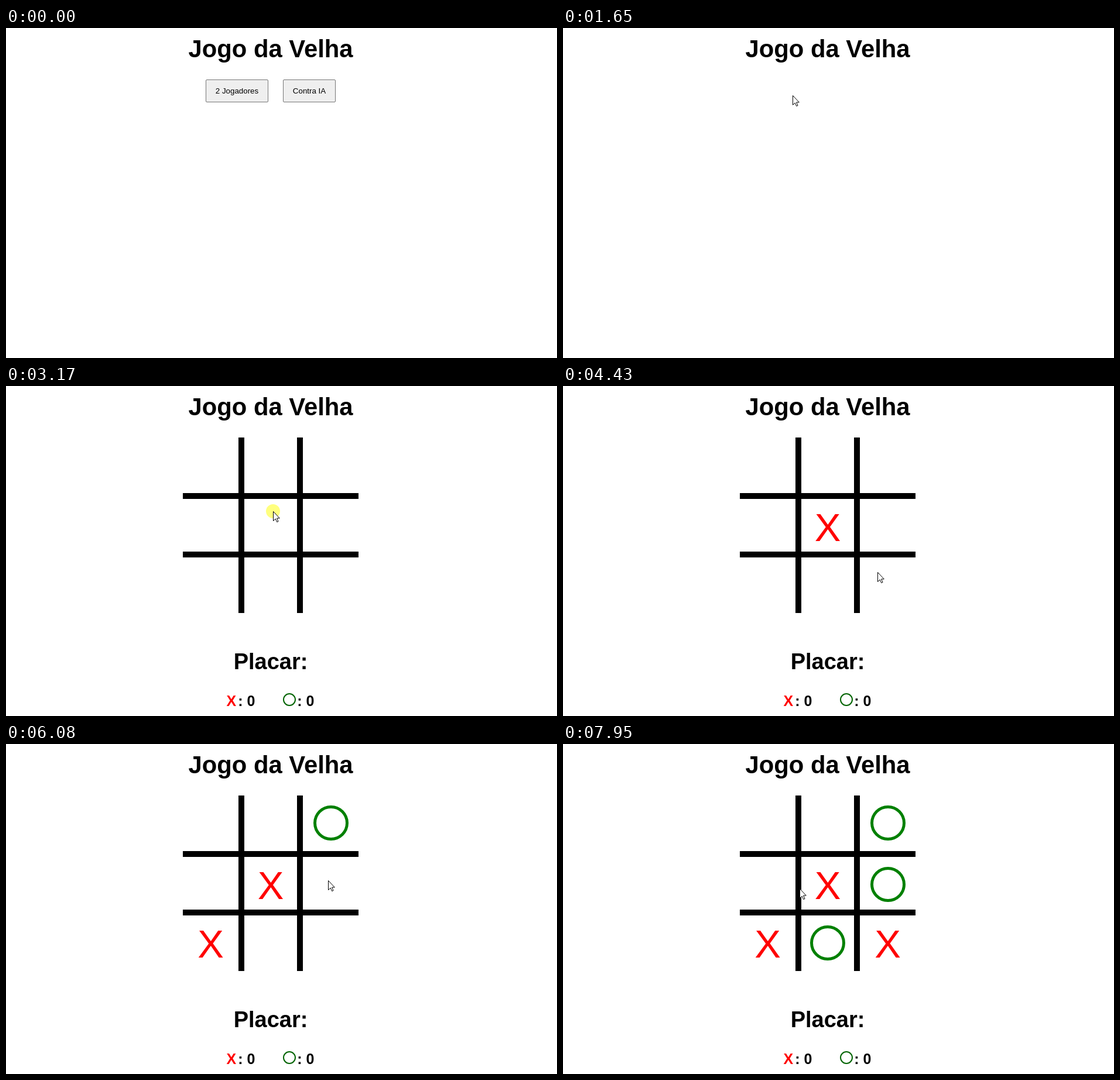
An HTML page for the animation above (8 s loop, 941 by 564 pixels).

```html
<!DOCTYPE html>
<html lang="pt">
<head>
<meta charset="utf-8">
<title>Jogo da Velha</title>
<style>
  html, body { margin: 0; width: 100%; height: 100%; overflow: hidden; background: #fff; }
  svg { display: block; font-family: Arial, "Liberation Sans", sans-serif; }
  .bold { font-weight: bold; }
  .mid { text-anchor: middle; }
  .button rect { fill: #efefef; stroke: #767676; }
  .button text { font-size: 13.333px; }
  .button.hover rect { fill: #e5e5e5; stroke: #4f4f4f; }
  .score { font-size: 25px; }
  .x { fill: #f00; }
  .mark { font-size: 67px; }
  .o { fill: none; stroke: #008000; stroke-width: 5; }
  .small.o { stroke: #006400; stroke-width: 2; }
  [hidden] { display: none; }
</style>
</head>
<body>
<svg width="941" height="564" viewBox="0 0 941 564">
  <text class="bold mid" x="452" y="50" font-size="41.8">Jogo da Velha</text>

  <g id="menu">
    <g class="button" id="twoPlayers">
      <rect x="341.5" y="88.5" width="106" height="38" rx="1.5"/>
      <text class="mid" x="394.5" y="112">2 Jogadores</text>
    </g>
    <g class="button">
      <rect x="473.5" y="88.5" width="89" height="38" rx="1.5"/>
      <text class="mid" x="518" y="112">Contra IA</text>
    </g>
  </g>

  <g id="game">
    <path d="M397 88h10v300h-10zM497 88h10v300h-10zM302 183h300v10H302zM302 283h300v10H302z"/>
    <text class="bold mid" x="452" y="484" font-size="38">Placar:</text>
    <g class="bold score">
      <text class="x" x="376.5" y="547">X</text>
      <text x="396.3" y="547">: 0</text>
      <circle class="small o" cx="484" cy="536" r="10"/>
      <text x="497.3" y="547">: 0</text>
    </g>
    <g id="marks"></g>
  </g>

  <g id="cursor">
    <circle id="click" r="12" fill="#ff0" fill-opacity=".5"/>
    <path d="M.5 .5V16.5L4.2 13L6.7 18.5L9 17.5L6.6 12H11.3Z" fill="#fff" stroke="#000"/>
  </g>
</svg>
<script>
const LOOP = 8000, STEP = 70, CLICK = 120;
const SPEED = 1.25; // pointer, px per ms
const ENTER = 130, MENU_END = 1650, GAME_START = 1980;

// X and O alternate, each a click length after its press.
const turns = [
  { at: 3290, col: 1, row: 1 },
  { at: 4720, col: 2, row: 0 },
  { at: 5330, col: 0, row: 2 },
  { at: 6270, col: 2, row: 1 },
  { at: 7030, col: 2, row: 2 },
  { at: 7740, col: 1, row: 2 }
];

// Pointer stops: arrival time and place.
const stops = [
  { at: ENTER, x: 867, y: 546 },
  { at: 410, x: 398, y: 386 },
  { at: 890, x: 336, y: 165 },
  { at: 1170, x: 392, y: 115 },
  { at: 2120, x: 444, y: 317 },
  { at: 2670, x: 396, y: 358 },
  { at: 3150, x: 456, y: 214 },
  { at: 3430, x: 554, y: 312 },
  { at: 4360, x: 537, y: 318 },
  { at: 4580, x: 556, y: 140 },
  { at: 4900, x: 441, y: 260 },
  { at: 5190, x: 350, y: 336 },
  { at: 5700, x: 518, y: 290 },
  { at: 6010, x: 550, y: 233 },
  { at: 6480, x: 552, y: 351 },
  { at: 7600, x: 444, y: 314 },
  { at: 7930, x: 404, y: 247 }
];

const $ = id => document.getElementById(id);
const show = (el, on) => el.toggleAttribute("hidden", !on);
const clickEnds = [MENU_END, ...turns.map(t => t.at)];

function addMark({ col, row }, turn) {
  const x = 452 + (col - 1) * 102.5;
  const y = row ? 140 + row * 100 : 135;
  $("marks").insertAdjacentHTML("beforeend", turn % 2
    ? `<circle class="o" cx="${Math.round(x)}" cy="${y}" r="27.5"/>`
    : `<text class="x mark mid" x="${x}" y="${y + 25}">X</text>`);
}

function pointerAt(time) {
  const next = stops.findIndex(s => s.at > time);
  if (next < 1) return stops.at(next);
  const a = stops[next - 1], b = stops[next];
  const travel = Math.min(b.at - a.at, Math.hypot(b.x - a.x, b.y - a.y) / SPEED);
  const left = Math.min(b.at - time, travel);
  const steps = Math.ceil(travel / STEP);
  const k = 1 - Math.ceil(left / travel * steps) / steps;
  return { x: Math.round(a.x + (b.x - a.x) * k), y: Math.round(a.y + (b.y - a.y) * k) };
}

function draw(time) {
  show($("menu"), time < MENU_END);
  show($("game"), time >= GAME_START);
  turns.forEach((turn, i) => show($("marks").children[i], time >= turn.at));

  const { x, y } = pointerAt(time);
  show($("cursor"), time >= ENTER);
  $("cursor").setAttribute("transform", `translate(${x} ${y})`);
  show($("click"), clickEnds.some(end => time >= end - CLICK && time < end));
  $("twoPlayers").classList.toggle("hover", x >= 341 && x < 448 && y >= 88 && y < 127);
}

turns.forEach(addMark);
const begin = performance.now();
function tick() {
  draw((performance.now() - begin) % LOOP);
  requestAnimationFrame(tick);
}
tick();
</script>
</body>
</html>
```
